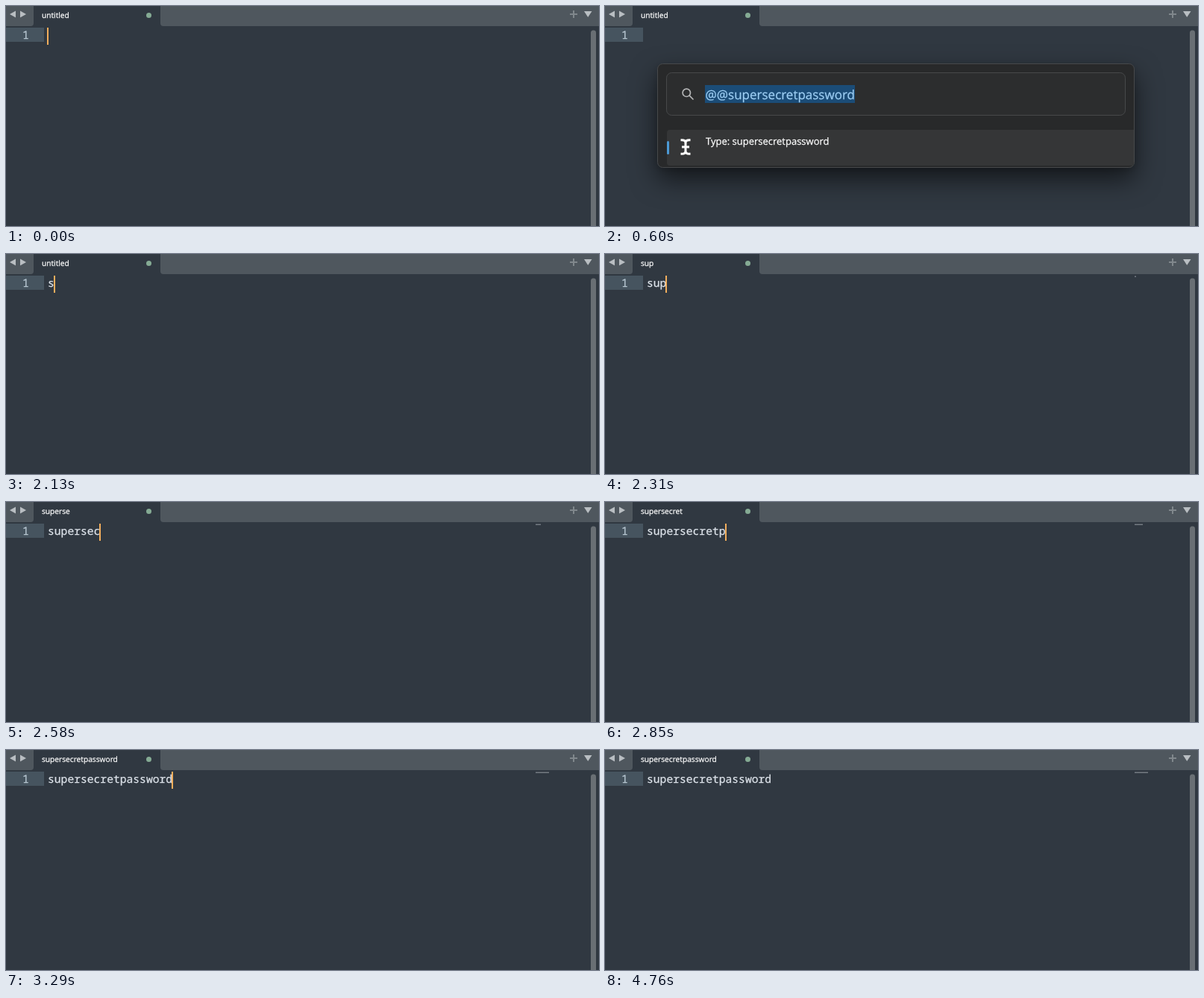
Recreate the animation shown at these times as an HTML page. Size 795x295 px, loop 4970 ms.

```html
<!DOCTYPE html>
<html lang="en">
<head>
<meta charset="utf-8">
<title>Typing a password into an editor</title>
<style>
  html, body { margin: 0; width: 100%; height: 100%; overflow: hidden; background: #303841; }
  svg { display: block; width: 795px; height: 295px; }
  text {
    white-space: pre; text-rendering: geometricPrecision;
    fill: currentColor; stroke: currentColor; stroke-width: .25px;
  }
  .ui { font-family: "Open Sans", "Noto Sans", sans-serif; color: #fff; }
  .mono { font: 14.66px "Noto Sans Mono", "DejaVu Sans Mono", monospace; color: #dde3ea; }
  #num { color: #b9c8d2; }
  #query { color: #9ccdf3; }
  #dialog {
    filter: drop-shadow(0 2px 5px rgba(0, 0, 0, .15)) drop-shadow(0 15px 17px rgba(0, 0, 0, .58));
  }
</style>
</head>
<body>
<svg viewBox="0 0 795 295">
  <rect width="795" height="295" fill="#303841"/>

  <!-- tab bar -->
  <g fill="#4f575e">
    <path d="M0 0H37V23a4 4 0 0 1-4 4H0z"/>
    <path d="M207 0H795V27H211a4 4 0 0 1-4-4z"/>
  </g>
  <path d="M13 6.5V15.5L5 11zM19 6.5V15.5L27 11zM775 7H785.5L780.2 15z" fill="#b9bec2"/>
  <path d="M756 11H766M761 6V16" stroke="#80878c" stroke-width="2"/>
  <circle cx="191.5" cy="12.5" r="3.5" fill="#85ab94"/>
  <text id="tab" class="ui" x="48" y="15.6" font-size="10.2"></text>

  <!-- editor -->
  <rect y="29" width="51" height="19" fill="#46545f"/>
  <text id="num" class="mono" x="22" y="44">1</text>
  <text id="code" class="mono" x="56" y="44"></text>
  <rect id="caret" y="29" width="2" height="23" fill="#f2ae5c"/>
  <rect id="map" x="710" y="29.5" height="1.5" fill="#747b82"/>
  <path d="M784 295V36a3.5 3.5 0 0 1 7 0V295z" fill="#696f74"/>

  <!-- launcher -->
  <g id="dialog">
    <rect x="70.5" y="77.5" width="639" height="139" rx="7" fill="#28292a" stroke="#47494b"/>
    <rect x="82.5" y="89.5" width="615" height="57" rx="7" fill="#2c2d2e" stroke="#47494a"/>
    <g fill="none" stroke="#b4b5b6" stroke-width="1.7" stroke-linecap="round">
      <circle cx="109.3" cy="116.3" r="5.2"/>
      <path d="M113.2 120.2L118 125"/>
    </g>
    <rect x="134" y="106" width="201" height="24" fill="#1b4c77"/>
    <text id="query" class="ui" x="134.5" y="125" font-size="17"></text>
    <path d="M709 166V214H87a4 4 0 0 1-4-4V170a4 4 0 0 1 4-4z" fill="#353637"/>
    <rect x="83" y="181" width="3" height="18" rx="1.5" fill="#4c9ad6"/>
    <path d="M103 179.7Q108 179.7 108 183.5Q108 179.7 113 179.7M108 182V196M103 198.3Q108 198.3 108 194.5Q108 198.3 113 198.3M104.5 189H111.5"
          fill="none" stroke="#fff" stroke-width="3" stroke-linecap="square"/>
    <text id="result" class="ui" x="135" y="186" font-size="13"></text>
  </g>
</svg>
<script>
  const LOOP = 4970, OPEN = 600, CLOSE = 1920, FOCUS = 1980, BLUR = 4760;
  const TYPE_START = 2130, KEY_TIME = 62, TAB_LAG = 41;
  const ADVANCE = 8.796;
  const WORD = "supersecretpassword";

  const el = id => document.getElementById(id);
  const [tab, code, caret, map, dialog] = ["tab", "code", "caret", "map", "dialog"].map(el);
  const show = (node, on) => node.setAttribute("visibility", on ? "visible" : "hidden");

  function lettersAt(t) {
    const n = Math.floor((t - TYPE_START) / KEY_TIME) + 1;
    return Math.min(WORD.length, Math.max(0, n));
  }

  function draw(t) {
    const typed = lettersAt(t);
    tab.textContent = WORD.slice(0, lettersAt(t - TAB_LAG)) || "untitled";
    code.textContent = WORD.slice(0, typed);
    caret.setAttribute("x", Math.round(55 + typed * ADVANCE));
    map.setAttribute("width", Math.max(0, typed - 1));
    show(caret, t < OPEN || (t >= FOCUS && t < BLUR));
    show(dialog, t >= OPEN && t < CLOSE);
  }

  el("query").textContent = "@@" + WORD;
  el("result").textContent = "Type: " + WORD;

  const start = performance.now();
  function tick() {
    draw((performance.now() - start) % LOOP);
    requestAnimationFrame(tick);
  }
  draw(0);
  requestAnimationFrame(tick);
</script>
</body>
</html>
```
